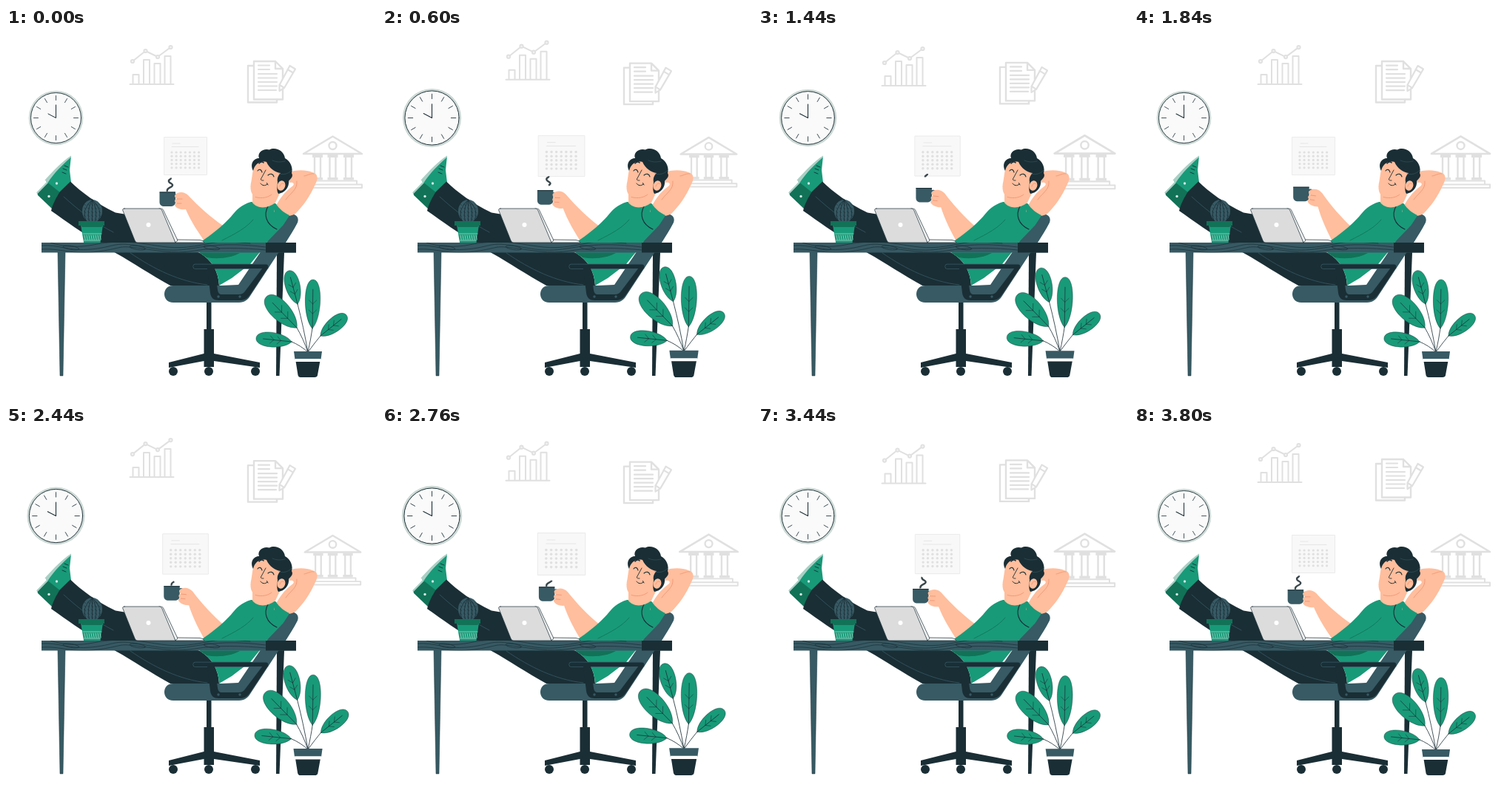
Recreate the animation shown at these times as an HTML page with a canvas. Size 500x500 px, loop 3840 ms.

```html
<!DOCTYPE html>
<html lang="en">
<head>
<meta charset="utf-8">
<title>Coffee break</title>
<style>
html, body { margin: 0; width: 100%; height: 100%; overflow: hidden; background: #fff; }
canvas { display: block; width: 500px; height: 500px; }
</style>
</head>
<body>
<canvas id="stage"></canvas>
<script>
const LOOP = 3840, HALF = LOOP / 2, STEP = 40, TAU = Math.PI * 2;
const DARK = '#1a2e35', SLATE = '#375a64', GREEN = '#189a78', DEEP = '#117257',
  SKIN = '#ffbe9d', SKIN_LINE = '#ef9270', PALE = '#e0e0e0', WHITE = '#fff';

const canvas = document.getElementById('stage');
const ratio = window.devicePixelRatio || 1;
canvas.width = canvas.height = 500 * ratio;
const ctx = canvas.getContext('2d');
ctx.lineCap = ctx.lineJoin = 'round';

const paths = new Map();
function path(d) {
  if (!paths.has(d)) paths.set(d, new Path2D(d));
  return paths.get(d);
}
function fill(d, color) {
  ctx.fillStyle = color;
  ctx.fill(path(d));
}
function line(d, color, width = 1) {
  ctx.strokeStyle = color;
  ctx.lineWidth = width;
  ctx.stroke(path(d));
}
function oval(x, y, rx, ry, color, angle = 0) {
  ctx.beginPath();
  ctx.ellipse(x, y, rx, ry, angle, 0, TAU);
  ctx.fillStyle = color;
  ctx.fill();
}
function dot(x, y, r, color) { oval(x, y, r, r, color); }
function ring(x, y, r, color, width) {
  ctx.beginPath();
  ctx.arc(x, y, r, 0, TAU);
  ctx.strokeStyle = color;
  ctx.lineWidth = width;
  ctx.stroke();
}
function box(x, y, w, h, color) {
  ctx.fillStyle = color;
  ctx.fillRect(x, y, w, h);
}
function group(draw, x, y, { scale = 1, angle = 0, dy = 0 }) {
  ctx.save();
  ctx.translate(x, y + dy);
  ctx.rotate(angle);
  ctx.scale(scale, scale);
  ctx.translate(-x, -y);
  draw();
  ctx.restore();
}
const wave = u => (1 - Math.cos(Math.PI * u)) / 2;

// Cosine-eased interpolation through [time, value] keys
function track(keys, t) {
  const i = keys.findIndex(k => k[0] > t);
  const [t0, v0] = keys[i - 1], [t1, v1] = keys[i];
  return v0 + (v1 - v0) * wave((t - t0) / (t1 - t0));
}
const CHART_Y = [[0, 0], [470, -7], [1220, 2.6], [HALF, 0]];
const BANK_SCALE = [[0, 1], [500, 0.955], [1230, 1.045], [HALF, 1]];

function chart() {
  line('M167.500 76H226.500 M171.500 76V63H179.500V76 M186 76V43H194V76 M200.500 76V48H208.500V76 M214.500 76V38H222.500V76', PALE, 2);
  line('M171 45L188.500 31L205 39L222.500 26', PALE, 2);
  for (const [x, y] of [[171, 45], [188.5, 31], [205, 39], [222.5, 26]]) {
    dot(x, y, 2.2, '#f2f2f2');
    ring(x, y, 2.2, PALE, 1.8);
  }
}

function documents() {
  line('M334 51H327V100.500H366V97', PALE, 2.4);
  line('M335 45H364L374 55V96.500H335Z M364 45V55H374', PALE, 2.4);
  line('M341 50.500H356 M341 56H356 M341 62H366 M341 67.500H366 M341 73H366 M341 78.500H366 M341 84H365', PALE, 2.2);
  fill('M383.500 51L391 55.500L376 81L369.500 85L369.500 77Z', WHITE);
  line('M383.500 51L391 55.500L376 81L369.500 85L369.500 77Z M380.500 56L388 60.500 M370 77L376 81', PALE, 2.2);
}

function bank() {
  line('M402 170L441.500 146.500L481 170Z', PALE, 2.6);
  ring(441.5, 159, 5, PALE, 2.4);
  for (const x of [421, 441.5, 463]) {
    box(x - 7, 171, 14, 4, PALE);
    line(`M${x - 4} 175V203 M${x + 4} 175V203`, PALE, 2.4);
    box(x - 7, 202, 14, 3.5, PALE);
  }
  line('M412 206.500H474V211.500H412Z M406 211.500H481V216H406Z', PALE, 2);
}

function calendar() {
  box(214, 147.5, 57.5, 51, '#f8f8f8');
  line('M214 147.500H271.500V198.500H214Z', '#e8e8e8', 0.8);
  line('M225 156H235 M224 160.500H260', '#e3e3e3', 0.8);
  for (let row = 0; row < 5; row++)
    for (let col = 0; col < 7; col++) dot(224 + col * 6.1, 168 + row * 5.2, 1.6, PALE);
}

function clock() {
  dot(67.5, 121.5, 36.8, '#ccd8d4');
  dot(67.5, 121.5, 34, '#fafafa');
  ring(67.5, 121.5, 34, DARK, 0.9);
  for (let i = 0; i < 12; i++) {
    const a = i * TAU / 12, c = Math.cos(a), s = Math.sin(a);
    ctx.beginPath();
    ctx.moveTo(67.5 + 24 * c, 121.5 + 24 * s);
    ctx.lineTo(67.5 + 30 * c, 121.5 + 30 * s);
    ctx.strokeStyle = DARK;
    ctx.lineWidth = 0.8;
    ctx.stroke();
  }
  line('M67.500 104V121.500L57 116', DARK, 1);
}

function chair() {
  fill('M377 255C385 247 398 253 394 263C389 273 384 280 378 290L368 304L330 362C325 370 320 371 312 371H226C210 371 210 348 226 348H292L314 347L343 304L352 290Z', SLATE);
  box(271, 371, 6.5, 37, DARK);
  fill('M267.500 407H281V440L343 452V459L281 450V458H267.500V450L220 459V452L267.500 440Z', DARK);
  for (const x of [226, 274, 337]) dot(x, 464, 6, DARK);
}

function armrest() {
  line('M256 322.300H351.500', SLATE, 7);
  line('M256 322.300H351.500', DARK, 5.6);
  fill('M272 325L276 358C277 365 281 368 287 368H316C322 368 326 366 330 360L354 324H347L322 357C320 359 318 360 315 360H292C288 360 287 358 286 354L282 325Z', DARK);
  dot(287, 363, 1.7, SLATE);
  dot(316, 363, 1.7, SLATE);
}

function shoes() {
  fill('M42 222L58 207L76 220L64 246L43 226Z', DEEP);
  line('M42.500 222.500L57 207.500', '#a9cfc4', 2.4);
  dot(58, 227.5, 1.7, '#d7eae4');
  fill('M88 173L86 192L88 209L74 223L54 207Z', GREEN);
  fill('M88 172.500C76 180 65 192 52.500 205.500L56.500 209C64 197 77 184 88 174.500Z', '#a9cfc4');
  line('M77 190L82 192 M76 195L81 197 M79 186L84 188', DARK, 0.9);
  dot(68.5, 210, 1.7, '#d7eae4');
}

function legs() {
  fill('M87 207.500C102 222 122 237 148 249.500L160 251.500L222 290L262 304C278 314 287 328 288 348H222C196 334 172 317 148 304L128 291C103 277 82 262 61 247C63 238 68 229 73 221Z', DARK);
  line('M78 228C100 248 120 263 145 276 M168 304C200 326 235 343 272 347', SLATE, 0.8);
}

function torso() {
  fill('M331 235C318 239 312 245 304 255C292 268 278 279 262 290L262 304C278 314 287 328 288 348L305 338L330 319L343 303L352 290L374 267L382 255L364 237Z', GREEN);
  fill('M262 304H316C306 310 288 313 271 310Z', DEEP);
  line('M354 241C348 252 351 265 366 272', DARK, 1.1);
  line('M334 259C325 270 310 278 292 287', DEEP, 0.8);
}

function head() {
  // raised arm behind the neck
  fill('M383 195C394 191 406 192 414 195C422 197 422 204 418 211C411 227 402 240 391 251C382 256 369 256 362 248C366 234 376 222 388 213C390 210 388 208 382 209Z', SKIN);
  line('M393 207C394 219 385 222 378 232 M403 200C408 199 412 196 416 197', SKIN_LINE, 0.8);
  fill('M364 237C370 245 376 250 383 253L374 267C364 261 360 250 364 237Z', GREEN);
  fill('M333 215L333 236C340 245 354 244 364 236L374 215Z', SKIN);
  fill('M336 183C333 193 333 199 331.500 207C329 217 331 226 338 229C347 232 358 229 364 221L375 207L370 180L346 175Z', SKIN);
  line('M337 228.500C346 231 354 229 359 225', SKIN_LINE, 0.8);
  fill('M334 193C329 183 335 176 342 176C339 168 348 162 356 164.500C364 160 376 166 377 176C385 180 388 190 386 196C389 201 384 204 382 207C383 216 376 223 368 224C365 219 367 213 367 208C366 203 368 199 371 196C364 195 356 190 352 181C343 179 336 184 334 193Z', DARK);
  oval(372, 213, 5.3, 6.8, SKIN, 0.3);
  line('M370 214C371 210 374 209 376 211', SKIN_LINE, 0.8);
  line('M369 197C377 199 383 196 386 192 M360 179C367 182 372 181 377 180', SLATE, 0.6);
  line('M342 183C344 180.500 347 180.500 348 182 M360 186C363 185 366 187 367 189', DARK, 1.6);
  line('M340 193C342 190 345 191 346 195 M354 199C357 196 361 197 362 201', DARK, 1.1);
  line('M351 192L344.500 204C344 206 346 206 348 206', DARK, 0.9);
  line('M344 210C346 213 350 214 353 211 M352.500 209.500L354 212', DARK, 1);
}

function steam(t) {
  const length = 27;
  const u = t < HALF ? t / HALF : (t - HALF) / HALF;
  if (t >= HALF && u < 0.03) return;
  ctx.save();
  ctx.lineCap = 'butt';
  ctx.setLineDash(t < HALF ? [length * (1 - u), 100] : [length * u, 100]);
  ctx.lineDashOffset = t < HALF ? -length * u : 0;
  line('M218 221C216 215 226 216 225 212C224 209 219 210 220 206C221 204 223 205 223 202.500', '#39474c', 2.4);
  ctx.restore();
}

function cup() {
  line('M228 226C237 223 237 236 228 235', SLATE, 2.5);
  fill('M207.500 221.500H229V235C229 239 226 241 222 241H214C210 241 207.500 239 207.500 235Z', SLATE);
  line('M208 222H228.500', DARK, 1);
}

function coffeeArm(t) {
  const angle = 0.142 * (1 - Math.abs(t / HALF - 1));
  group(() => {
    fill('M246 226C261 242 276 255 293 267L278 295L271 292C261 278 250 262 242 243Z', SKIN);
    // the cup stays level while the forearm turns
    group(() => { steam(t); cup(); }, 218, 231, { angle: -angle });
    fill('M229 225C233 221 241 221 246 226L250 234L243 245C237 246 231 244 229 241C227 239 229 237 231 237C227 236 227 231 231 231C228 229 227 227 229 225Z', SKIN);
    line('M231 231H238 M231 237H237', SKIN_LINE, 0.8);
  }, 272, 284, { angle });
}

function laptop() {
  const base = 'M230 286L262 286.500C265 287 267 288 268 290H229Z';
  const edge = 'M207 244C210 244 212 244 213 247L232 287L229 290L207 250Z';
  const lid = 'M160 244H207C209 244 210 245 211 247L229 290H178C176 290 175 289 174 287L158 247C157 245 158 244 160 244Z';
  for (const [shape, color] of [[base, '#f2f2f2'], [edge, '#f2f2f2'], [lid, '#dcdcdc']]) {
    fill(shape, color);
    line(shape, DARK, 0.7);
  }
  dot(192.5, 266, 3, WHITE);
}

function cactus() {
  oval(116.5, 247.5, 13.5, 15.5, SLATE);
  for (let i = -2; i <= 2; i++) {
    const x = 116.5 + i * 5;
    line(`M116.500 232Q${x + i * 3} 246 ${x - i} 262`, DARK, 0.8);
    for (let y = 238; y < 260; y += 5) line(`M${x - 1} ${y}L${x + 1} ${y + 1.5}`, DARK, 0.6);
  }
  fill('M101 266H131L127.500 290H105Z', GREEN);
  box(98, 261, 35, 6, DEEP);
  fill('M102 267H130L129.500 269H102.500Z', DEEP);
  line('M104 278H129 M105 287H127', '#d2e9e2', 0.6);
  for (let x = 106; x < 128; x += 3) line(`M${x} 280L${x + 1.2} 286`, '#d2e9e2', 0.6);
}

function tableLegs() {
  fill('M70 303H80L77 470H73Z', SLATE);
  line('M70 303L73 470H77L80 303', DARK, 0.5);
  fill('M366 303H376L369.500 470H365Z', DARK);
}

function tableTop() {
  box(48, 290, 344, 13.5, SLATE);
  ctx.save();
  ctx.beginPath();
  ctx.rect(48, 290, 303, 13.5);
  ctx.clip();
  line('M48 294C70 292 85 302 115 299S145 290 170 293S215 304 250 298S310 291 351 296', DARK, 0.7);
  line('M48 299C72 297 90 307 125 302S150 294 176 297S225 306 255 301S320 297 351 300', DARK, 0.7);
  line('M60 290C78 296 98 297 118 293S160 287 190 292S235 299 265 293S300 289 330 291', DARK, 0.7);
  for (const x of [88, 178, 278]) {
    ctx.beginPath();
    ctx.ellipse(x, 297, 11, 2.5, 0.15, 0, TAU);
    ctx.stroke();
  }
  ctx.restore();
  box(351, 290, 41, 13.5, DARK);
}

function leaf(bx, by, tx, ty, width) {
  const size = Math.hypot(tx - bx, ty - by), w = width * 0.68;
  line(`M408 438Q${(408 + bx) / 2 + 1} ${(438 + by) / 2 - 2} ${bx} ${by}`, DARK, 0.8);
  ctx.save();
  ctx.translate(bx, by);
  ctx.rotate(Math.atan2(ty - by, tx - bx));
  const outline = `M0 0C${size * 0.2} ${-w} ${size} ${-w * 1.1} ${size} 0C${size} ${w * 1.1} ${size * 0.2} ${w} 0 0Z`;
  fill(outline, GREEN);
  line(outline, DARK, 0.4);
  line(`M0 0H${size * 0.8}`, DARK, 0.7);
  for (const u of [0.3, 0.5]) {
    const x = size * u, d = width * 0.27;
    line(`M${x} 0L${x + d} ${-d} M${x} 0L${x + d} ${d}`, DARK, 0.5);
  }
  ctx.restore();
}

function plant() {
  leaf(394, 373, 382, 328, 18.5);
  leaf(414, 406, 415, 340, 19);
  leaf(393, 405, 352, 363, 24);
  leaf(386, 424, 338, 419, 18.5);
  leaf(425, 416, 460, 388, 18);
  fill('M391 447H425L421 469C421 471 419 472 417 472H398C396 472 395 471 394.500 469Z', DARK);
  fill('M389 437H427L425.500 448H390.500Z', SLATE);
  fill('M390.500 447H425.500L425 451H391Z', WHITE);
}

function render(t) {
  const half = t % HALF, pulse = wave(half / HALF * 2);
  ctx.setTransform(ratio, 0, 0, ratio, 0, 0);
  box(0, 0, 500, 500, WHITE);

  group(chart, 197, 50, { dy: track(CHART_Y, half) });
  group(documents, 358, 72, { dy: 3.8 * pulse });
  group(bank, 441.5, 181, { scale: track(BANK_SCALE, half) });
  group(calendar, 242.8, 173, { scale: 1 + 0.12 * pulse });
  group(clock, 67.5, 121.5, { scale: 1 + 0.11 * pulse });

  tableLegs();
  chair();
  shoes();
  legs();
  coffeeArm(t);
  torso();
  head();
  armrest();
  tableTop();
  laptop();
  cactus();
  group(plant, 407, 472, { scale: 1 + 0.05 * pulse });
}

function frame() {
  const t = performance.now() % LOOP;
  render(Math.floor(t / STEP) * STEP);
  requestAnimationFrame(frame);
}
frame();
</script>
</body>
</html>
```
